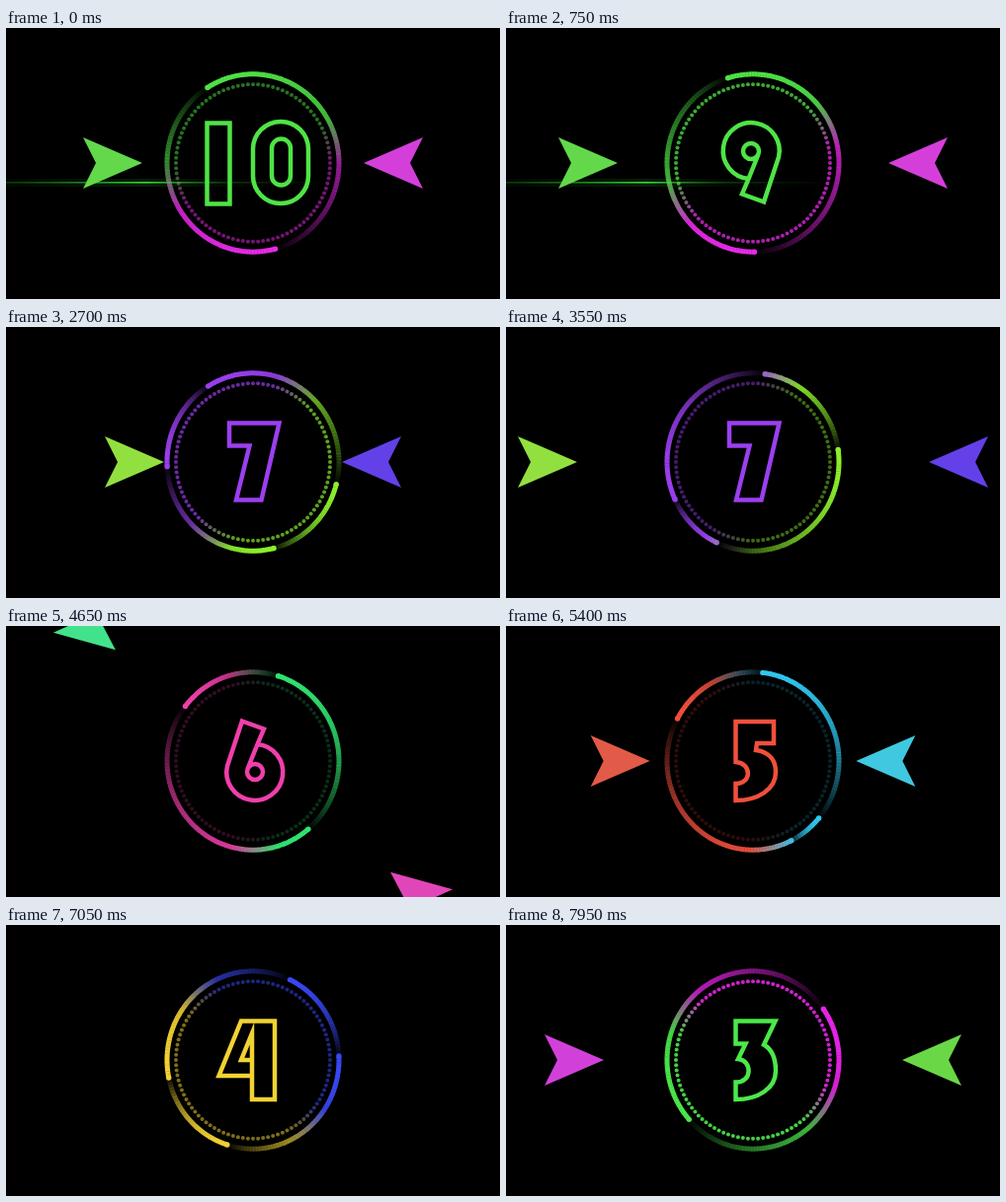
Animation of 500x275 px, one loop 8000 ms. Source, as an HTML page with a canvas:

```html
<!DOCTYPE html>
<html lang="en">
<head>
<meta charset="utf-8">
<title>Countdown</title>
<style>
html, body { margin: 0; width: 100%; height: 100%; overflow: hidden; background: #000; }
canvas { display: block; width: 100vw; height: 100vh; }
</style>
</head>
<body>
<canvas id="stage" width="500" height="275"></canvas>
<script>
const ctx = document.getElementById('stage').getContext('2d');
const LOOP = 8000, STEP = 50, BEAT = 1192, HIT = 25;
const CX = 250, CY = 137, TAU = Math.PI * 2, RAD = Math.PI / 180;
const RING = { x: 87, y: 90.2 }, DOTS = { x: 78, y: 79.8 };

const six = 'M239 96.500L261 104.500L254.500 120A28.500 28.500 0 1 1 224 142Z' +
  'M254.5 120L244.5 145M244 148a8 8 0 1 0 16 0a8 8 0 1 0 -16 0';
const glyph = {
  10: 'M203.5 96.5h23v82h-23ZM250 123a28 28 0 0 1 56 0v27a28 28 0 0 1 -56 0Z' +
    'M269 122a9.5 9.5 0 0 1 19 0v28a9.5 9.5 0 0 1 -19 0Z',
  9: six,
  8: 'M230.4 132.9A24 24 0 1 1 269.6 132.9A27 27 0 1 1 230.4 132.9Z' +
    'M242 118.5a8 8 0 1 0 16 0a8 8 0 1 0 -16 0M240.5 151.5a9.5 9.5 0 1 0 19 0a9.5 9.5 0 1 0 -19 0',
  7: 'M226 97.5H276.500L258.500 175.500H233L246.5 120.5H226Z',
  6: six,
  5: 'M232.5 97H271V119H254L253 126C268 128 273 138 273 148C273 166 255 177 232.5 177V160C249 160 249 139 232.5 138Z',
  4: 'M238 97.5H272V177H249V153H215.5ZM249 153V110L238 137H249',
  3: 'M232.5 97.500H272.500L261 121.500C269 126 273 136 273 148C273 166 255 177 232.5 177V159.500C250 160 249 137 235 136L242.500 120.500H232.5Z'
};
const outlines = {};
for (const n in glyph) outlines[n] = new Path2D(glyph[n]);

// digit, matching arrow, opposite arrow, opposite side of the ring
const green = ['#4fe446', '#62d84a', '#d43fda', '#e82ae8'];
const palette = {
  10: green,
  9: green,
  8: ['#40d8e4', '#4fd0a4', '#e34242', '#ec3040'],
  7: ['#9b3ff0', '#6440e8', '#92e040', '#8cf02c'],
  6: ['#f03fab', '#e046b8', '#42e28c', '#30e470'],
  5: ['#f0503c', '#e25a48', '#40c8e0', '#30c8f0'],
  4: ['#f2d232', '#e29c46', '#4058e4', '#3848f4'],
  3: ['#4be84a', '#6ad846', '#d240da', '#e824e8']
};

const reach = [[0, 112], [25, 90], [450, 90], [580, 95], [658, 109], [750, 137],
  [798, 151], [1016, 165], [1074, 179], [1166, 178], [BEAT, 112]];

// time, four arc heads in degrees, brightness of the dots
const ringKeys = [
  [0, -122, -122, 75, 75, .5],
  [750, -107, -107, 89, 89, .75],
  [1850, -161, -161, 37, 37, .9],
  [3550, -205, -82, -8, 115, .45],
  [4650, -142, -73, 50, 50, .2],
  [6150, -161, -94, 30, 77, .15],
  [7950, -222, -35, -35, 138, .9]
];

const clamp = (v, lo, hi) => Math.min(hi, Math.max(lo, v));
const lerp = (a, b, p) => a + (b - a) * p;
const easeInOut = p => p < .5 ? 4 * p ** 3 : 1 - 4 * (1 - p) ** 3;
const rgb = hex => [1, 3, 5].map(i => parseInt(hex.slice(i, i + 2), 16));

function sample(keys, t) {
  const next = keys.findIndex(k => k[0] > t);
  if (next < 0) return keys[keys.length - 1].slice(1);
  const a = keys[next - 1], b = keys[next];
  const p = (t - a[0]) / (b[0] - a[0]);
  return a.slice(1).map((v, j) => lerp(v, b[j + 1], p));
}

function drawFlare(t) {
  const strength = 1 - clamp((t - 800) / 350, 0, 1);
  if (!strength) return;
  const fade = ctx.createLinearGradient(0, 0, 340, 0);
  fade.addColorStop(0, 'rgba(20,110,20,.45)');
  fade.addColorStop(.42, 'rgba(60,225,60,.95)');
  fade.addColorStop(.65, 'rgba(30,130,30,.4)');
  fade.addColorStop(1, 'rgba(10,60,10,0)');
  ctx.fillStyle = fade;
  ctx.globalAlpha = strength;
  ctx.fillRect(0, 156, 340, 1.6);
  ctx.globalAlpha = strength * .15;
  ctx.fillRect(0, 153, 340, 8);
  ctx.globalAlpha = 1;
}

function drawDot(radii, angle, size) {
  ctx.beginPath();
  ctx.arc(CX + radii.x * Math.cos(angle * RAD), CY + radii.y * Math.sin(angle * RAD), size, 0, TAU);
  ctx.fill();
}

function drawRing(t, colors) {
  const state = sample(ringKeys, t), heads = state.slice(0, 4), dots = state[4];
  const first = rgb(colors[0]), second = rgb(colors[3]);
  const centre = -105 - t * .0165;
  const colorAt = angle => {
    const w = clamp(.5 + 1.8 * Math.cos((angle - centre) * RAD), 0, 1);
    return `rgb(${first.map((v, i) => Math.round(lerp(second[i], v, w)))})`;
  };

  ctx.lineWidth = 5;
  heads.forEach((head, i) => {
    const end = i < 3 ? heads[i + 1] : heads[0] + 360, span = end - head;
    if (span < 2) return;
    for (let a = 0; a < span; a += 2) {
      ctx.globalAlpha = 1 - (a / span) ** 2;
      ctx.strokeStyle = colorAt(head + a);
      ctx.beginPath();
      ctx.ellipse(CX, CY, RING.x, RING.y, 0, (head + a) * RAD, (head + Math.min(span, a + 2.2)) * RAD);
      ctx.stroke();
    }
    ctx.globalAlpha = 1;
    ctx.fillStyle = colorAt(head);
    drawDot(RING, head, 2.7);
  });

  ctx.globalAlpha = dots;
  for (let angle = 0; angle < 360; angle += 3.75) {
    ctx.fillStyle = colorAt(angle);
    drawDot(DOTS, angle, 2);
  }
  ctx.globalAlpha = 1;
}

function drawArrow(angle, distance, color) {
  ctx.save();
  ctx.translate(CX, CY);
  ctx.rotate(angle);
  ctx.translate(distance, 0);
  ctx.fillStyle = color;
  ctx.beginPath();
  ctx.moveTo(0, 0);
  ctx.lineTo(60, -26);
  ctx.lineTo(47, 0);
  ctx.lineTo(60, 26);
  ctx.fill();
  ctx.restore();
}

// The pair makes a half turn at the end of every second beat.
function drawArrows(t, colors) {
  const beat = Math.floor(t / BEAT), phase = t % BEAT;
  const turn = beat % 2 ? easeInOut(clamp((phase - 1004) / 185, 0, 1)) : 0;
  const angle = Math.PI * (1 + Math.floor(beat / 2) + turn);
  const [distance] = sample(reach, phase);
  drawArrow(angle, distance, colors[1]);
  drawArrow(angle + Math.PI, distance, colors[2]);
}

function drawDigit(digit, color) {
  ctx.save();
  if (digit === 9) {
    ctx.translate(500, 273);
    ctx.rotate(Math.PI);
  }
  ctx.strokeStyle = color;
  ctx.lineWidth = 4.5;
  ctx.stroke(outlines[digit]);
  ctx.restore();
}

function render(now) {
  const t = Math.floor((now % LOOP) / STEP) * STEP;
  const digit = 9 - Math.floor((t - HIT) / BEAT);
  const colors = palette[digit];
  ctx.fillStyle = '#000';
  ctx.fillRect(0, 0, 500, 275);
  drawFlare(t);
  drawRing(t, colors);
  drawArrows(t, colors);
  drawDigit(digit, colors[0]);
}

const start = performance.now();
function tick() {
  render(performance.now() - start);
  requestAnimationFrame(tick);
}
tick();
</script>
</body>
</html>
```
